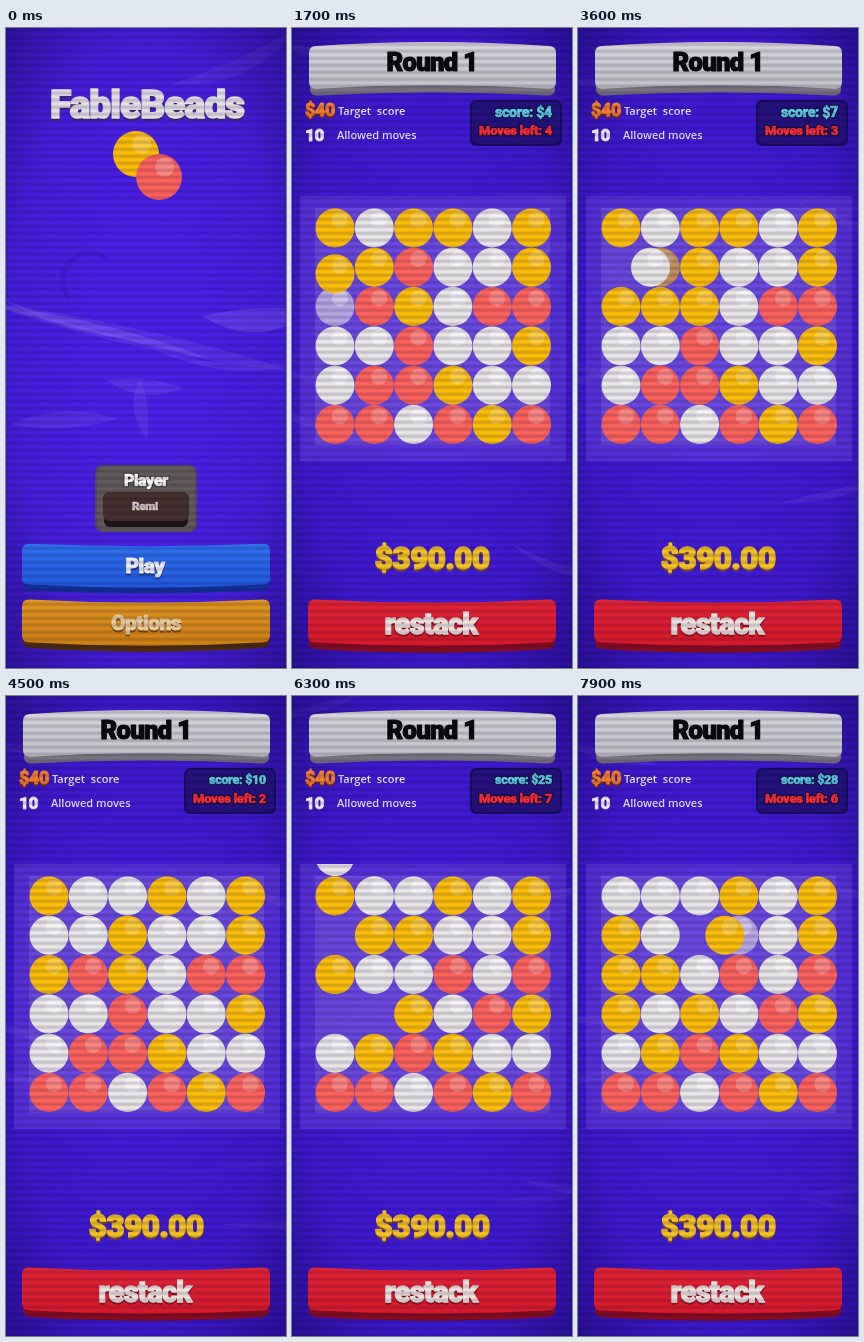
Write an HTML page with a canvas that moves like this. It is 280 px wide and 640 px high and loops after 8 s.

```html
<!DOCTYPE html>
<html lang="en">
<head>
<meta charset="utf-8">
<title>Ball puzzle</title>
<style>
  html, body { margin: 0; width: 100%; height: 100%; overflow: hidden; background: #2a0c9c; }
  canvas { display: block; width: 100vw; height: 100vh; }
</style>
</head>
<body>
<canvas id="stage" width="280" height="640"></canvas>
<script>
const ctx = document.getElementById('stage').getContext('2d');
const W = 280, H = 640, LOOP = 8000, FRAME = 100;
const GAME_START = 300, CELL = 39.3, FALL = 337;
const COLORS = { Y: '#ffc008', W: '#ebe9e8', R: '#ff645c' };

// Board states: start time, score, moves left, rows from top to bottom.
const steps = [
  [GAME_START, 0, 5, 'YYRWWY WYYWWY YRYYRR WWRWWY WRRYWW RRWRYR'],
  [1250, 4, 4, 'YWYYWY YYRWWY WRYWRR WWRWWY WRRYWW RRWRYR'],
  [1950, 7, 3, 'YWYYWY WYYWWY YY.WRR WWRWWY WR.YWW RRWRYR'],
  [2300, 7, 3, 'YWYYWY WYYWWY YYYWRR WWRWWY WR.YWW RRWRYR'],
  [2700, 7, 3, 'YWYYWY WYYWWY YYYWRR WWRWWY WRRYWW RRWRYR'],
  [3700, 10, 2, 'YWWYWY WWYWWY YRYWRR WWRWWY WRRYWW RRWRYR'],
  [5100, 17, 1, 'YWWYWY WYYWWY YWWRWR WYYWRY WYRYWW RRWRYR'],
  [6300, 25, 7, 'WWWYWY YWYWWY YYWRWR YWYWRY WYRYWW RRWRYR'],
  [7580, 28, 6, 'WWWYWY YWYWWY YYWRWR YWYWRY WYRYWW RRWRYR']
].map(([t, score, moves, rows]) => ({ t, score, moves, rows: rows.split(' ') }));

// Dragged balls: start, duration, row, column, row step, column step.
const drags = [
  [850, 400, 1, 1, 1, 0],
  [1650, 300, 1, 0, 1, 0],
  [3300, 400, 1, 0, 0, 1],
  [4700, 400, 4, 2, 0, 1],
  [5900, 400, 3, 1, 0, -1],
  [7580, 500, 1, 2, 0, 1]
];

// The display lettering uses the narrowest heavy face at hand.
const faceFont = (face, size) => `900 extra-condensed ${size}px "${face}", sans-serif`;
const widthOf = face => {
  ctx.font = faceFont(face, 100);
  return ctx.measureText('restack Options').width;
};
const FACE = ['Roboto', 'Open Sans', 'Noto Sans', 'Lato', 'Liberation Sans Narrow', 'Liberation Sans']
  .reduce((best, face) => widthOf(face) < widthOf(best) ? face : best);

function setDisplay(size) {
  ctx.font = faceFont(FACE, size);
  ctx.letterSpacing = `${-0.025 * size}px`;
}

function box(x, y, w, h, r, fill) {
  ctx.fillStyle = fill;
  ctx.beginPath();
  ctx.roundRect(x, y, w, h, r);
  ctx.fill();
}

// A rounded bar bent outwards like the glass of a tube.
function bar(x, y, w, h, fill) {
  const r = 7, mid = x + w / 2, right = x + w, bottom = y + h;
  const bow = v => v + (v - H / 2) / H * 12;
  const sag = v => v - (v - H / 2) / H * 4;
  const top = sag(y), low = sag(bottom);
  ctx.fillStyle = fill;
  ctx.beginPath();
  ctx.moveTo(x + r, top);
  ctx.quadraticCurveTo(mid, bow(y), right - r, top);
  ctx.quadraticCurveTo(right, top, right, top + r);
  ctx.lineTo(right, low - r);
  ctx.quadraticCurveTo(right, low, right - r, low);
  ctx.quadraticCurveTo(mid, bow(bottom), x + r, low);
  ctx.quadraticCurveTo(x, low, x, low - r);
  ctx.lineTo(x, top + r);
  ctx.quadraticCurveTo(x, top, x + r, top);
  ctx.fill();
}

function vertical(y, h, ...stops) {
  const g = ctx.createLinearGradient(0, y, 0, y + h);
  stops.forEach((c, i) => g.addColorStop(i / (stops.length - 1), c));
  return g;
}

// y is the middle of the capitals; the size drops when the line is too long.
function label(text, x, y, size, maxW, fill, { align = 'center', edge = '', shadow = '' } = {}) {
  setDisplay(size);
  size *= Math.min(1, maxW / ctx.measureText(text).width);
  setDisplay(size);
  ctx.textAlign = align;
  ctx.lineJoin = 'round';
  const base = y + size * 0.357;
  const heavy = (color, dy, extra) => {
    ctx.fillStyle = ctx.strokeStyle = color;
    ctx.lineWidth = size * 0.045 + extra;
    ctx.strokeText(text, x, base + dy);
    ctx.fillText(text, x, base + dy);
  };
  if (shadow) heavy(shadow, 2, 0);
  if (edge) heavy(edge, 0, 2);
  heavy(fill, 0, 0);
  ctx.letterSpacing = '0px';
}

function note(text, x, y) {
  ctx.font = '600 11px "Open Sans", "Noto Sans", sans-serif';
  ctx.textAlign = 'left';
  ctx.fillStyle = '#f4f0ff';
  ctx.fillText(text, x, y);
}

function button(x, y, w, h, lip, fill, under) {
  bar(x + 1, y + 6, w - 2, h + lip - 6, under);
  bar(x, y, w, h, fill);
}

function disc(x, y, r, fill) {
  ctx.fillStyle = fill;
  ctx.beginPath();
  ctx.arc(x, y, r, 0, Math.PI * 2);
  ctx.fill();
}

function ball(x, y, kind, r = 19.5, alpha = 1) {
  ctx.globalAlpha = alpha;
  disc(x, y, r, COLORS[kind]);
  disc(x + r * 0.25, y - r * 0.43, r * 0.42, `rgba(255,255,255,${kind === 'W' ? 0.6 : 0.24})`);
  ctx.globalAlpha = 1;
}

function ribbon(x, y, angle, len, bend, width, alpha) {
  ctx.save();
  ctx.translate(x, y);
  ctx.rotate(angle);
  ctx.fillStyle = `rgba(150,112,255,${alpha})`;
  ctx.beginPath();
  ctx.moveTo(0, 0);
  ctx.quadraticCurveTo(len / 2, bend, len, 0);
  ctx.quadraticCurveTo(len / 2, bend + width, 0, 0);
  ctx.fill();
  ctx.restore();
}

function backdrop(t, menu) {
  ctx.fillStyle = menu ? '#4c20ea' : '#431bdb';
  ctx.fillRect(0, 0, W, H);
  const s = t / 1000;
  if (menu) {
    const d = s * 14;
    ribbon(-30 + d, 272, 0.22, 330, -14, 34, 0.2);
    ribbon(-20 + d, 276, 0.24, 230, -14, 18, 0.34);
    ribbon(-10 + d, 268, 0.3, 150, 8, 9, 0.24);
    ribbon(196 - d, 288, -0.05, 110, -10, 48, 0.32);
    ribbon(150 - d, 322, 0.08, 150, 16, 12, 0.22);
    ribbon(4 + d, 396, -0.05, 108, -20, 34, 0.2);
    ribbon(100 + d, 352, 0.1, 78, -10, 32, 0.22);
    ribbon(134, 350 + d, 1.45, 62, -8, 28, 0.2);
    ribbon(165 + d, 56, -0.42, 140, 8, 30, 0.16);
    ctx.strokeStyle = 'rgba(35,5,140,.2)';
    ctx.lineWidth = 5;
    ctx.beginPath();
    ctx.arc(84, 252, 27, 2.4, 5.4);
    ctx.stroke();
  } else {
    for (let i = 0; i < 9; i++) {
      const side = i % 2 ? 215 : -45;
      const y = (i * 167 + 320 + 18 * Math.sin(s * 0.8 + i)) % H;
      const alpha = 0.1 + 0.09 * Math.sin(s * 1.7 + i * 2.3);
      ribbon(side + 14 * Math.sin(s + i), y, 0.3 * Math.sin(i * 4 + s * 0.4), 115, 12 * Math.cos(i + s), 16, alpha);
    }
  }
  vignette();
}

function vignette() {
  const shade = ctx.createRadialGradient(140, 140, 50, 140, 140, 200);
  shade.addColorStop(0, 'rgba(10,0,60,0)');
  shade.addColorStop(0.55, 'rgba(10,0,60,.08)');
  shade.addColorStop(1, 'rgba(10,0,60,.45)');
  ctx.save();
  ctx.scale(1, H / W);
  ctx.fillStyle = shade;
  ctx.fillRect(0, 0, W, W);
  ctx.restore();
}

function drawMenu() {
  label('FableBeads', 141, 76, 54, 194, '#e6e3e8', { shadow: '#3a2a70' });
  ball(130, 126, 'Y', 23);
  ball(153, 149, 'R', 23);

  box(89, 437, 102, 67, 8, '#55505a');
  box(91, 439, 98, 63, 7, '#625c5a');
  label('Player', 140, 452, 20, 44, '#fff', { edge: '#37302e' });
  box(98, 470, 84, 29, 6, '#201414');
  box(97, 464, 86, 29, 6, '#46302b');
  label('Remi', 139, 478, 17, 26, '#d8d1cc');

  button(16, 517, 248, 41, 6, vertical(517, 41, '#2f72f0', '#235ce0'), '#12309a');
  label('Play', 139, 538, 27, 39, '#f2f2f6', { shadow: '#173c98' });
  button(16, 573, 248, 43, 6, vertical(573, 43, '#e29820', '#d08212'), '#4d2c10');
  label('Options', 140, 595, 27, 70, '#ead0a0', { shadow: '#854d0c' });
}

function drawHud({ score, moves }) {
  button(17, 16, 247, 43, 7, vertical(16, 43, '#d9d8dc', '#c4c3c8'), '#77747e');
  label('Round 1', 140, 34, 34, 91, '#090909');

  label('$40', 13, 82, 23, 30, '#f6812a', { align: 'left', shadow: '#6b2430' });
  note('Target  score', 46, 87);
  label('10', 13, 107, 23, 19, '#efecf4', { align: 'left' });
  note('Allowed moves', 45, 111);

  box(178, 72, 92, 46, 6, '#180c60');
  box(180, 74, 88, 42, 5, '#24127c');
  const right = { align: 'right', edge: '#0e0838' };
  label(`score: $${score}`, 260, 84, 15, 57, '#61d0ec', right);
  label(`Moves left: ${moves}`, 260, 102, 15, 73, '#ff3038', right);

  label('$390.00', 140, 530, 40, 115, '#f5c522', { shadow: '#7c4a38' });
  button(16, 573, 248, 43, 7, vertical(573, 43, '#e52434', '#d91a2a'), '#860c20');
  label('restack', 139, 596, 35, 93, '#eee5df', { shadow: '#8c1020' });
}

function drawBoard(t, index) {
  const { rows, t: start } = steps[index];
  const before = index ? steps[index - 1].rows : rows;
  const p = Math.min(1, (t - start) / FALL);
  const drag = drags.find(([t0, d]) => t >= t0 && t < t0 + d);
  const [t0, span, dr, dc, stepR, stepC] = drag || [0, 1, -1, -1, 0, 0];

  box(8, 168, 266, 265, 0, 'rgba(135,105,230,.3)');
  box(23, 180, 235, 237, 0, 'rgba(150,125,225,.3)');
  const at = (r, c) => [43 + c * CELL, 200 + r * CELL];

  ctx.save();
  ctx.beginPath();
  ctx.rect(8, 168, 266, 265);
  ctx.clip();
  rows.forEach((row, r) => [...row].forEach((kind, c) => {
    if (kind === '.' || (r === dr && c === dc)) return;
    const [x, y] = at(r, c);
    const drop = kind === before[r][c] ? 0 : CELL * (1 - p * p);
    const partner = r === dr + stepR && c === dc + stepC;
    ball(x, y - drop, kind, 19.5, drag && partner ? 0.6 : 1);
  }));
  if (drag) {
    const k = (t - t0) / span;
    const [x, y] = at(dr + stepR * k, dc + stepC * k);
    ball(x, y, rows[dr][dc]);
  }
  ctx.restore();
}

function scanlines() {
  for (let y = 0; y < H; y++) {
    ctx.fillStyle = `rgba(12,4,50,${0.085 * (1 + Math.sin(y * Math.PI * 2 / 7))})`;
    ctx.fillRect(0, y, W, 1);
  }
}

function draw(now) {
  const t = Math.floor((now % LOOP) / FRAME) * FRAME;
  const menu = t < GAME_START;
  backdrop(t, menu);
  if (menu) {
    drawMenu();
  } else {
    const index = steps.findLastIndex(s => s.t <= t);
    drawBoard(t, index);
    drawHud(steps[index]);
  }
  scanlines();
}

const origin = performance.now();
function tick() {
  draw(performance.now() - origin);
  requestAnimationFrame(tick);
}
tick();
</script>
</body>
</html>
```
